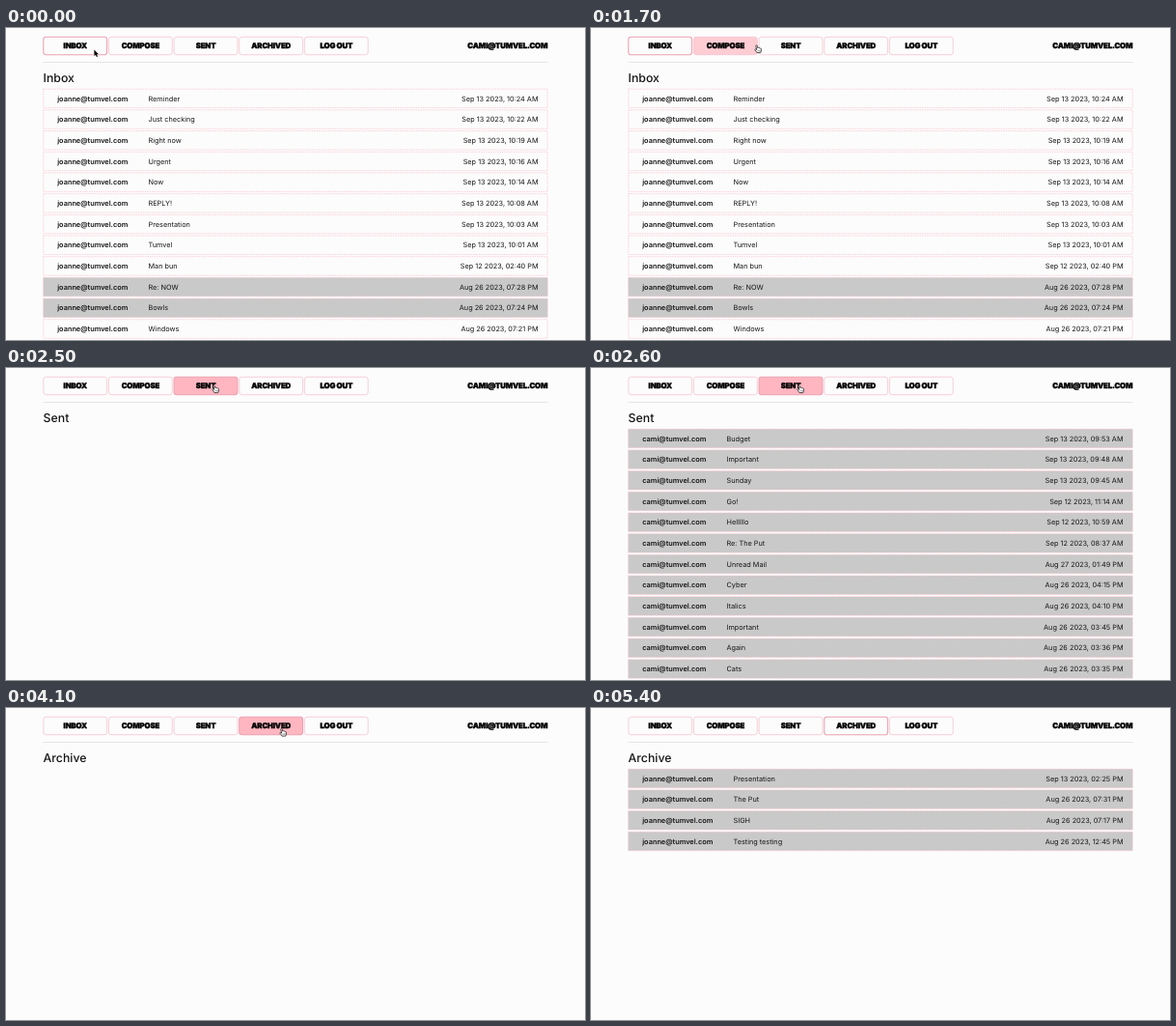
Write an HTML page with a canvas that moves like this. It is 600 px wide and 323 px high and loops after 6400 ms.

```html
<!DOCTYPE html>
<html lang="en">
<head>
<meta charset="utf-8">
<title>Mailbox</title>
<style>
  html, body { margin: 0; width: 100%; height: 100%; overflow: hidden; background: #fcfcfc; }
  canvas { display: block; width: 600px; height: 323px; }
</style>
</head>
<body>
<canvas id="stage"></canvas>
<script>
const W = 600, H = 323, LOOP = 6400, STEP = 100;
const LEFT = 38.6, RIGHT = 561.3;
const PAPER = '#fcfcfc', PINK = '#ffb6c1', INK = '#161616';
const SANS = 'Inter, "Liberation Sans", sans-serif';

const canvas = document.getElementById('stage');
const ctx = canvas.getContext('2d');
const ratio = window.devicePixelRatio || 1;
canvas.width = W * ratio;
canvas.height = H * ratio;
ctx.scale(ratio, ratio);
ctx.textRendering = 'geometricPrecision';

const USER = 'cami@tumvel.com', FRIEND = 'joanne@tumvel.com';
const BUTTONS = ['INBOX', 'COMPOSE', 'SENT', 'ARCHIVED', 'LOG OUT'];
const BTN = { w: 65.8, h: 18.4, y: 9.3, pitch: 67.65 };

const S13 = 'Sep 13 2023, ', S12 = 'Sep 12 2023, ', A27 = 'Aug 27 2023, ', A26 = 'Aug 26 2023, ';
const BOXES = {
  Inbox: {
    from: FRIEND, x: 147.5, isRead: i => i === 9 || i === 10,
    mails: [
      ['Reminder', S13 + '10:24 AM'], ['Just checking', S13 + '10:22 AM'],
      ['Right now', S13 + '10:19 AM'], ['Urgent', S13 + '10:16 AM'],
      ['Now', S13 + '10:14 AM'], ['REPLY!', S13 + '10:08 AM'],
      ['Presentation', S13 + '10:03 AM'], ['Tumvel', S13 + '10:01 AM'],
      ['Man bun', S12 + '02:40 PM'], ['Re: NOW', A26 + '07:28 PM'],
      ['Bowls', A26 + '07:24 PM'], ['Windows', A26 + '07:21 PM']
    ]
  },
  Sent: {
    from: USER, x: 140.5, isRead: () => true,
    mails: [
      ['Budget', S13 + '09:53 AM'], ['Important', S13 + '09:48 AM'],
      ['Sunday', S13 + '09:45 AM'], ['Go!', S12 + '11:14 AM'],
      ['Helllllo', S12 + '10:59 AM'], ['Re: The Put', S12 + '08:37 AM'],
      ['Unread Mail', A27 + '01:49 PM'], ['Cyber', A26 + '04:15 PM'],
      ['Italics', A26 + '04:10 PM'], ['Important', A26 + '03:45 PM'],
      ['Again', A26 + '03:36 PM'], ['Cats', A26 + '03:35 PM']
    ]
  },
  Archive: {
    from: FRIEND, x: 147.5, isRead: () => true,
    mails: [
      ['Presentation', S13 + '02:25 PM'], ['The Put', A26 + '07:31 PM'],
      ['SIGH', A26 + '07:17 PM'], ['Testing testing', A26 + '12:45 PM']
    ]
  }
};

// When each page is opened, when its mails arrive, and the focused button
const VISITS = [
  { name: 'Inbox', click: 0, open: 0, loaded: 0, button: 0 },
  { name: 'Sent', click: 2400, open: 2500, loaded: 2600, button: 2 },
  { name: 'Archive', click: 4000, open: 4100, loaded: 4200, button: 3 }
];

// Hover periods: button, start, end
const HOVERS = [[0, 200, 1400], [1, 1500, 1700], [2, 1800, 2800], [3, 2800, 5300]];
const FADE = 150;

// Pointer path: time, x, y
const PATH = [
  [0, 93, 25], [1300, 93, 24], [1500, 128, 22], [1700, 173, 21.5], [2000, 217, 21.5],
  [2600, 217, 21.5], [2800, 238, 25], [3000, 262, 26.5], [3200, 287, 25], [LOOP, 287, 25]
];

const latest = (key, t) => VISITS.filter(v => v[key] <= t).pop();
const clamp = v => Math.max(0, Math.min(1, v));

function pointerAt(t) {
  const i = PATH.findIndex(p => p[0] > t);
  const [t0, x0, y0] = PATH[i - 1], [t1, x1, y1] = PATH[i];
  const k = (t - t0) / (t1 - t0);
  return [x0 + (x1 - x0) * k, y0 + (y1 - y0) * k];
}

function hoverLevel(button, t) {
  return HOVERS.filter(h => h[0] === button).reduce((level, [, on, off]) => {
    if (t < on) return level;
    const rise = (t - on + 50) / FADE, fall = (t - off + 50) / FADE;
    return t < off ? clamp(rise) : 1 - clamp(fall);
  }, 0);
}

function text(str, x, y, font, align = 'left', color = INK) {
  ctx.font = font + ' ' + SANS;
  ctx.textAlign = align;
  ctx.textBaseline = 'alphabetic';
  ctx.fillStyle = color;
  ctx.fillText(str, x, y);
}

function chunky(str, x, y, align) {
  ctx.letterSpacing = '-0.15px';
  text(str, x, y, '900 7.8px', align, '#000');
  ctx.strokeStyle = '#000';
  ctx.lineWidth = 0.35;
  ctx.strokeText(str, x, y);
  ctx.letterSpacing = '0px';
}

function drawNav(t) {
  const focused = latest('click', t).button;
  BUTTONS.forEach((label, i) => {
    const x = LEFT + 0.2 + i * BTN.pitch;
    ctx.beginPath();
    ctx.roundRect(x, BTN.y, BTN.w, BTN.h, 2.6);
    ctx.fillStyle = PAPER;
    ctx.fill();
    ctx.globalAlpha = hoverLevel(i, t);
    ctx.fillStyle = PINK;
    ctx.fill();
    ctx.globalAlpha = 1;
    ctx.strokeStyle = i === focused ? '#eda3b3' : '#f5c5ce';
    ctx.lineWidth = i === focused ? 1.1 : 0.8;
    ctx.stroke();
    chunky(label, x + BTN.w / 2, 21.4, 'center');
  });
  chunky(USER.toUpperCase(), RIGHT, 21.4, 'right');
  ctx.fillStyle = '#e2e2e2';
  ctx.fillRect(LEFT, 35.2, RIGHT - LEFT, 0.8);
}

function drawMail([subject, date], i, box) {
  const y = 63.2 + i * 21.69, h = 19.4, base = y + 12.3;
  if (box.isRead(i)) {
    ctx.fillStyle = '#c9c9c9';
    ctx.fillRect(LEFT, y, RIGHT - LEFT, h);
  }
  ctx.strokeStyle = '#fbbcc8';
  ctx.lineWidth = 0.7;
  ctx.setLineDash([1.4, 1]);
  ctx.strokeRect(LEFT + 0.2, y, RIGHT - LEFT - 0.4, h);
  ctx.setLineDash([]);
  text(box.from, 53.2, base, '600 7.35px');
  text(subject, box.x, base, '400 7.3px');
  text(date, 551.5, base, '400 7.3px', 'right');
}

function drawArrow(x, y) {
  ctx.beginPath();
  [[0, 0], [0, 6.6], [1.5, 5.3], [2.5, 7.5], [3.6, 7], [2.7, 4.9], [4.6, 4.8]]
    .forEach(([dx, dy]) => ctx.lineTo(x + dx, y + dy));
  ctx.closePath();
  ctx.lineJoin = 'round';
  ctx.strokeStyle = '#fff';
  ctx.lineWidth = 1;
  ctx.stroke();
  ctx.fillStyle = '#000';
  ctx.fill();
}

function drawHand(x, y) {
  ctx.save();
  ctx.translate(x, y);
  ctx.beginPath();
  ctx.moveTo(-1.3, 1);
  ctx.lineTo(-2.2, -3);
  ctx.quadraticCurveTo(-1.6, -4.5, -0.8, -3.2);
  ctx.lineTo(-0.3, -1);
  ctx.quadraticCurveTo(0.6, -1.7, 1.1, -0.8);
  ctx.quadraticCurveTo(2, -1.3, 2.4, -0.4);
  ctx.quadraticCurveTo(3.5, -0.6, 3.5, 0.8);
  ctx.quadraticCurveTo(3.6, 2.4, 2.7, 4.1);
  ctx.lineTo(-1, 4.1);
  ctx.quadraticCurveTo(-1.8, 2.6, -3.3, 0.9);
  ctx.quadraticCurveTo(-2.9, -0.3, -1.3, 1);
  ctx.closePath();
  ctx.fillStyle = '#fff';
  ctx.fill();
  ctx.strokeStyle = '#222';
  ctx.lineWidth = 0.8;
  ctx.lineJoin = 'round';
  ctx.stroke();
  ctx.beginPath();
  for (const dx of [0, 1.1, 2.2]) {
    ctx.moveTo(dx, 1.2);
    ctx.lineTo(dx + 0.1, 2.9);
  }
  ctx.lineWidth = 0.4;
  ctx.stroke();
  ctx.restore();
}

function draw(t) {
  ctx.fillStyle = PAPER;
  ctx.fillRect(0, 0, W, H);
  drawNav(t);

  const page = latest('open', t);
  text(page.name, LEFT, 56.2, '500 12.3px');
  if (t >= page.loaded) {
    const box = BOXES[page.name];
    box.mails.forEach((mail, i) => drawMail(mail, i, box));
  }

  if (t < 200) drawArrow(91.4, 22.4);
  else if (t < 5300) drawHand(...pointerAt(t));
}

const start = performance.now();
function tick() {
  const t = (performance.now() - start) % LOOP;
  draw(Math.floor(t / STEP) * STEP);
  requestAnimationFrame(tick);
}
tick();
</script>
</body>
</html>
```
